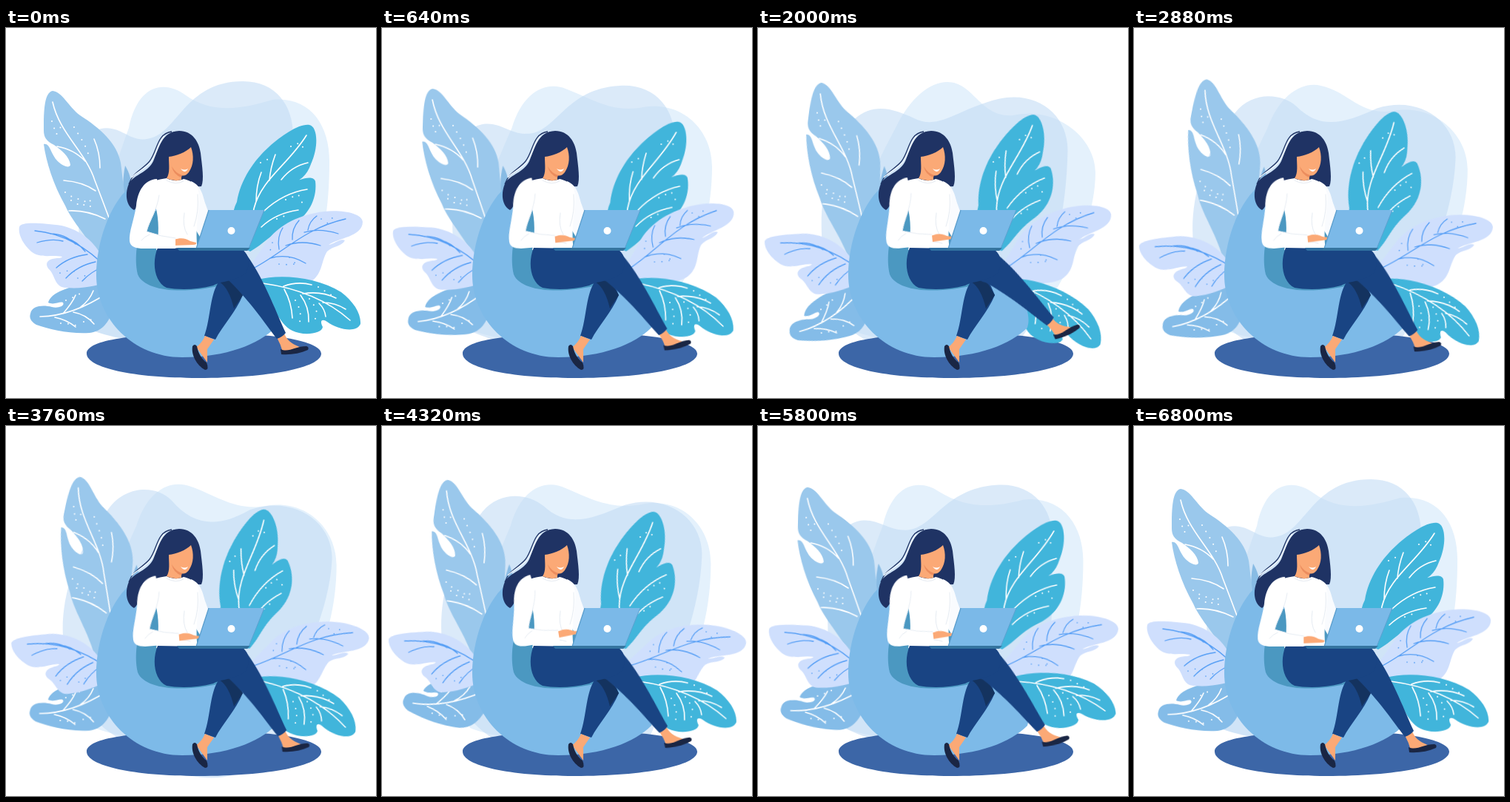
Recreate the animation shown at these times as an HTML page without scripts. Size 500 by 500 pixels, loop 6.84 s.

```html
<!DOCTYPE html>
<html lang="en">
<head>
<meta charset="utf-8">
<title>Working outdoors</title>
<style>
html, body { margin: 0; width: 100%; height: 100%; overflow: hidden; background: #fff; }
svg { display: block; width: 100vw; height: 100vh; }

.move { animation: 6.84s linear infinite; }
.vein, .dots { fill: none; stroke: #fff; stroke-width: 1.6; stroke-linecap: round; }
.dots { stroke-width: 2; stroke-dasharray: 0 10; }
.blue .vein, .blue .dots { stroke: #559ef5; }
.blue .vein { stroke-width: 1.3; }
.blue .dots { stroke-width: 1.7; }
.fold { fill: none; stroke: #e6ecf3; stroke-width: 1; stroke-linecap: round; }
.skin { fill: #fba976; }
.pants { fill: #194483; }
.shoe { fill: #1a2644; }
.hair { fill: #1f3364; }

.sway { animation-name: sway; }
.tall-left { --a: 13deg; transform-origin: 161px 263px; }
.tall-right { --a: -22deg; transform-origin: 326px 303px; }
.mid-left { animation-name: mid-left; transform-origin: 137px 335px; }
.mid-right { animation-name: mid-right; transform-origin: 338px 325px; }
.low-left { animation-name: low-left; transform-origin: 133px 358px; }
.low-right { animation-name: low-right; transform-origin: 347px 341px; }
.shin { animation-name: kick; transform-origin: 312px 322px; animation-timing-function: ease-in-out; }
.arm { animation-name: type; transform-origin: 185px 225px; }

@keyframes sway {
  0% { transform: rotate(0deg); animation-timing-function: cubic-bezier(.35, .2, .75, .8); }
  50% { transform: rotate(var(--a)); animation-timing-function: cubic-bezier(.25, .2, .45, .98); }
  100% { transform: rotate(0deg); }
}
@keyframes mid-left {
  0%, 100% { transform: rotate(0deg); }
  9.4% { transform: rotate(-2.8deg); }
  29.2% { transform: rotate(-9.2deg); animation-timing-function: ease-out; }
  44% { transform: rotate(-12deg); animation-timing-function: ease-in; }
  55% { transform: rotate(-11.5deg); }
  71.3% { transform: rotate(-7deg); }
  84.8% { transform: rotate(-2.8deg); }
}
@keyframes mid-right {
  0%, 100% { transform: rotate(0deg); }
  9.4% { transform: rotate(-5.5deg); animation-timing-function: ease-out; }
  19% { transform: rotate(-7deg); animation-timing-function: ease-in; }
  29.2% { transform: rotate(-4.1deg); }
  55% { transform: rotate(9.7deg); animation-timing-function: ease-out; }
  64% { transform: rotate(12.2deg); animation-timing-function: ease-in; }
  71.3% { transform: rotate(11.2deg); }
  84.8% { transform: rotate(4.9deg); }
}
@keyframes low-left {
  0%, 100% { transform: rotate(0deg); }
  9.4% { transform: rotate(-4.5deg); animation-timing-function: ease-out; }
  29.2% { transform: rotate(-14deg); animation-timing-function: ease-in; }
  55% { transform: rotate(1deg); animation-timing-function: ease-out; }
  71.3% { transform: rotate(14deg); animation-timing-function: ease-in-out; }
  84.8% { transform: rotate(3.5deg); }
}
@keyframes low-right {
  0%, 100% { transform: rotate(0deg); }
  9.4% { transform: rotate(4deg); animation-timing-function: ease-out; }
  29.2% { transform: rotate(13deg); animation-timing-function: ease-in; }
  55% { transform: rotate(6deg); }
  71.3% { transform: rotate(-5.6deg); animation-timing-function: ease-in-out; }
  84.8% { transform: rotate(-4.8deg); }
}
@keyframes kick {
  0%, 50%, 100% { transform: rotate(0deg); }
  25% { transform: rotate(-16.5deg); }
  75% { transform: rotate(-9.7deg); }
}
@keyframes type {
  0%, 100% { transform: rotate(0deg); }
  9.4% { transform: rotate(-4.5deg); }
  29.2% { transform: rotate(-6deg); }
  55% { transform: rotate(-4.5deg); }
  71.3% { transform: rotate(-14deg); }
  84.8% { transform: rotate(-7.3deg); }
}
</style>
</head>
<body>
<svg viewBox="0 0 500 500" role="img" aria-label="Woman with a laptop on a bean bag among leaves">

  <!-- backdrop -->
  <path fill="#e4f1fc">
    <animate attributeName="d" dur="6.84s" repeatCount="indefinite" calcMode="spline"
      keyTimes="0;.292;1" keySplines=".3 .5 .7 1;.2 .35 .6 .8"
      values="M166 135 C178 75 215 70 243 91 C280 117 320 109 360 97 C410 92 437 130 437 180 C437 240 430 300 400 350 C350 430 180 435 115 408 C100 340 135 220 166 135Z;
              M186 135 C205 95 232 73 256 73 C292 73 300 122 345 118 C405 105 456 150 456 195 C456 245 435 300 405 350 C350 430 190 435 125 408 C90 340 140 220 186 135Z;
              M166 135 C178 75 215 70 243 91 C280 117 320 109 360 97 C410 92 437 130 437 180 C437 240 430 300 400 350 C350 430 180 435 115 408 C100 340 135 220 166 135Z"/>
  </path>
  <path fill="#c3dcf5" opacity=".6">
    <animate attributeName="d" dur="6.84s" repeatCount="indefinite" calcMode="spline"
      keyTimes="0;.5;1" keySplines=".35 .2 .75 .8;.4 .1 .6 1"
      values="M118 140 C150 124 165 155 190 150 C232 145 240 72 320 72 C365 72 388 105 388 145 C388 250 400 300 380 360 C350 440 200 440 115 408 C100 380 85 180 118 140Z;
              M140 110 C162 78 205 76 225 98 C255 136 290 140 330 115 C390 94 443 130 443 180 C440 250 400 320 370 400 C350 500 240 500 150 420 C80 380 30 250 140 110Z;
              M118 140 C150 124 165 155 190 150 C232 145 240 72 320 72 C365 72 388 105 388 145 C388 250 400 300 380 360 C350 440 200 440 115 408 C100 380 85 180 118 140Z"/>
  </path>
  <path fill="#3c66a7" d="M109 440 C109 421 175 413 267 413 C365 411 426 424 426 440 C426 459 355 473 260 473 C172 473 109 459 109 440Z"/>

  <!-- leaves -->
  <g class="move sway tall-left">
    <path fill="#88bbe4" d="M161 186 C167 196 170 205 170 225 L160 240 C157 220 158 200 161 186Z"/>
    <path fill="#9ac8ec" d="M63 85 C76 86 84 106 100 118 C128 136 150 156 155 182 C158 202 158 224 168 250 L172 325 L138 335 C120 290 92 268 80 240 C64 212 54 180 51 157 C59 155 60 168 68 178 C76 187 86 190 87 185 C86 174 75 165 65 158 C54 153 51 147 51 138 C51 110 52 87 63 85Z"/>
    <path class="vein" d="M63 100 C72 142 108 168 120 206 Q130 232 139 256 M119 150 Q127 168 127 189 M69 160 Q92 164 107 180 M78 206 Q104 208 121 220 M85 247 Q110 246 134 258"/>
    <path class="dots" d="M62 126 L68 144 L76 130 M92 134 L106 157 L112 172 M80 222 L92 230 L104 232 L116 243 M88 233 L102 241 L116 232"/>
  </g>
  <g class="move sway tall-right">
    <path fill="#41b5db" d="M410 131 C421 133 423 160 412 184 C407 199 396 208 382 212 C396 204 415 198 418 207 C421 231 408 257 382 268 C358 278 348 292 330 302 L305 290 C306 268 304 250 312 235 C317 205 335 179 355 161 C373 145 396 129 410 131Z"/>
    <path class="vein" d="M406 145 C382 184 345 204 335 244 L328 284 M364 171 Q357 190 356 206 M408 182 Q386 187 372 205 M345 195 Q338 213 338 235 M407 218 Q375 223 349 247 M395 246 Q365 250 345 269"/>
    <path class="dots" d="M385 160 L397 155 L406 168 M344 182 L357 176 M378 232 L395 225 L402 240 M366 258 L382 252"/>
  </g>
  <g class="move low-left">
    <path fill="#84bce8" d="M33 386 C35 375 50 374 62 377 C70 379 80 376 77 371 C72 369 65 375 57 371 C61 357 86 349 110 346 L142 348 L145 380 C139 398 130 410 113 412 C88 414 58 407 41 401 C34 397 31 392 33 386Z"/>
    <path class="vein" d="M46 390 Q91 389 137 358 M77 386 Q90 371 94 361 M101 377 Q113 368 118 355 M66 391 Q82 394 94 404 M91 384 Q108 387 119 400"/>
    <path class="dots" d="M81 368 L91 364 L104 357 M74 399 L88 400 L101 404 M105 397 L123 392"/>
  </g>
  <g class="move mid-left blue">
    <path fill="#cfdffd" d="M18 269 C20 261 50 264 75 267 C101 273 120 289 130 310 L145 340 C128 348 103 353 82 351 C65 351 67 334 58 326 C52 319 55 312 69 311 Q75 311 76 309 C61 306 46 312 34 302 C23 292 16 279 18 269Z"/>
    <path class="vein" d="M39 274 Q94 279 139 327 M60 278 Q79 278 94 292 M81 284 Q96 288 107 302 M42 290 Q62 284 77 288 M68 324 Q85 309 110 306 M81 338 Q97 321 121 316 M103 342 Q115 329 131 323"/>
    <path class="dots" d="M73 331 L87 327 L100 331 M97 338 L112 333"/>
  </g>
  <g class="move mid-right blue">
    <path fill="#cfdffd" d="M482 262 C481 248 443 244 418 250 C386 256 362 273 351 291 L327 325 L350 343 C380 350 402 350 413 342 C428 332 426 314 434 302 C441 295 454 295 458 287 C451 284 444 292 436 293 C448 284 482 282 482 262Z"/>
    <path class="vein" d="M330 327 C373 306 401 271 459 258 M369 299 Q366 282 374 270 M387 286 Q386 271 396 260 M408 273 Q410 261 420 254 M378 294 Q400 286 425 294 M357 311 Q382 304 405 318 M403 276 Q424 270 449 278"/>
    <path class="dots" d="M360 290 L357 301 M426 258 L435 264 L444 253 M369 319 L383 320 L396 318 M383 310 L395 322"/>
  </g>
  <g class="move low-right">
    <path fill="#41b5db" d="M340 340 C370 332 420 336 453 357 C470 370 480 386 479 400 C473 413 448 407 434 397 C428 393 423 394 428 404 C427 414 400 416 387 409 C367 399 360 370 340 340Z"/>
    <path class="vein" d="M347 345 Q420 355 465 395 M375 349 Q394 342 413 347 M401 359 Q426 355 446 365 M428 371 Q445 371 459 380 M376 353 Q386 371 387 392 M398 361 Q410 377 409 397 M423 372 Q431 380 432 390"/>
    <path class="dots" d="M391 368 L398 382 L397 399 M410 366 L420 380 L417 399 M422 350 L440 361"/>
  </g>

  <!-- bean bag -->
  <path fill="#7dbae8" d="M166 216 C140 239 122 290 122 334 C122 393 172 445 238 445 C298 445 342 427 364 405 C374 380 340 325 300 300 L205 235Z"/>
  <path fill="#4b98c1" d="M194 248 C178 270 172 310 178 333 C188 357 242 360 294 347 L300 298 L225 245Z"/>

  <!-- hair -->
  <path class="hair" d="M234 139 C252 139 261 154 263 169 C265 187 268 205 264 214 L228 216 L194 216 C181 223 182 240 173 246 C160 239 161 218 168 207 C179 196 192 194 199 180 C207 162 210 140 234 139Z"/>
  <path d="M224 140 C203 143 205 166 194 180 C184 192 171 195 166 211" fill="none" stroke="#1f3364" stroke-width="1.3"/>
  <path d="M214 146 C205 156 204 170 196 181 C186 192 176 195 170 202" fill="none" stroke="#eef5fc" stroke-width="1.2"/>

  <!-- body -->
  <path fill="#f9fbfe" d="M250 207 C265 213 266 228 270 239 L275 253 L263 284 L249 260Z"/>
  <path fill="#fff" d="M217 203 C225 207 233 207 240 204 C252 207 261 212 261 228 C261 250 255 270 259 300 L203 300 C207 280 207 260 202 240 L192 215 C194 207 205 205 217 203Z"/>
  <path class="fold" d="M259 225 Q261 248 254 268 M217 206 Q229 213 240 207 M241 250 Q238 268 245 279 M225 291 Q238 287 249 291"/>
  <path class="skin" d="M250 161 C254 172 254 185 247 195 Q242 201 237 199 L237 205 Q228 208 217 203 C222 196 220 185 220 174 C230 173 243 168 250 161Z"/>
  <path fill="#ec8d5e" d="M224 187 Q229 196 238 199 L237 202 Q226 198 224 187Z"/>
  <path fill="#fff" d="M236 190 Q241 193 246 190 Q242 198 236 190Z"/>

  <!-- legs -->
  <path class="pants" d="M290 340 C275 356 277 392 268 416 L283 421 C292 403 310 385 320 361 L308 333Z"/>
  <path fill="#14335f" d="M288 343 L304 334 L320 361 L308 379 C304 362 298 349 288 343Z"/>
  <path class="skin" d="M269 416 L281 421 L272 434 L272 452 L257 431 Q264 427 269 416Z"/>
  <path class="shoe" d="M252 430 Q255 426 258 430 C260 441 266 449 271 452 Q275 462 269 462 C258 456 250 442 252 430Z"/>
  <g class="move shin">
    <path class="skin" d="M366 418 L376 413 C381 425 390 428 399 432 L374 438 Q371 427 366 418Z"/>
    <path class="shoe" d="M371 434 C382 439 391 430 406 430 Q410 431 408 435 C397 440 384 442 372 441Z"/>
    <path class="pants" d="M321 301 C347 334 364 382 378 412 Q373 418 366 420 C349 398 332 372 302 342 A22 22 0 0 1 321 301Z"/>
  </g>
  <path class="pants" d="M205 297 L318 299 C328 304 331 318 324 331 C312 342 290 342 280 348 C258 354 232 354 217 351 C200 343 197 316 205 297Z"/>

  <!-- arm and laptop -->
  <path fill="#2f6fa0" d="M231 297 H330 L326 301 H234Z"/>
  <g class="move arm">
    <path class="skin" d="M227 286 C236 283 243 284 249 288 L257 290 Q258 293 253 293 L227 294Z"/>
    <path fill="#fff" d="M204 204 C187 205 178 220 176 240 C173 260 166 275 167 288 C168 296 176 298 186 298 L229 298 L229 284 C215 282 201 278 190 275 C194 260 205 247 207 224Z"/>
    <path class="fold" d="M207 226 C204 247 194 259 190 275 Q209 282 229 284 M194 279 Q187 282 183 287"/>
  </g>
  <path fill="#7bb9e8" d="M274 246 H349 L328 298 H257Z"/>
  <path d="M274 246 L257 298" stroke="#579bcb" stroke-width="1.2"/>
  <path d="M349 246 L328 298" stroke="#5ba0d0" stroke-width="1"/>
  <path fill="#35749f" d="M255 297 H329 L326 300.5 H255Z"/>
  <circle cx="304.5" cy="274" r="5" fill="#fff"/>
</svg>
</body>
</html>
```
